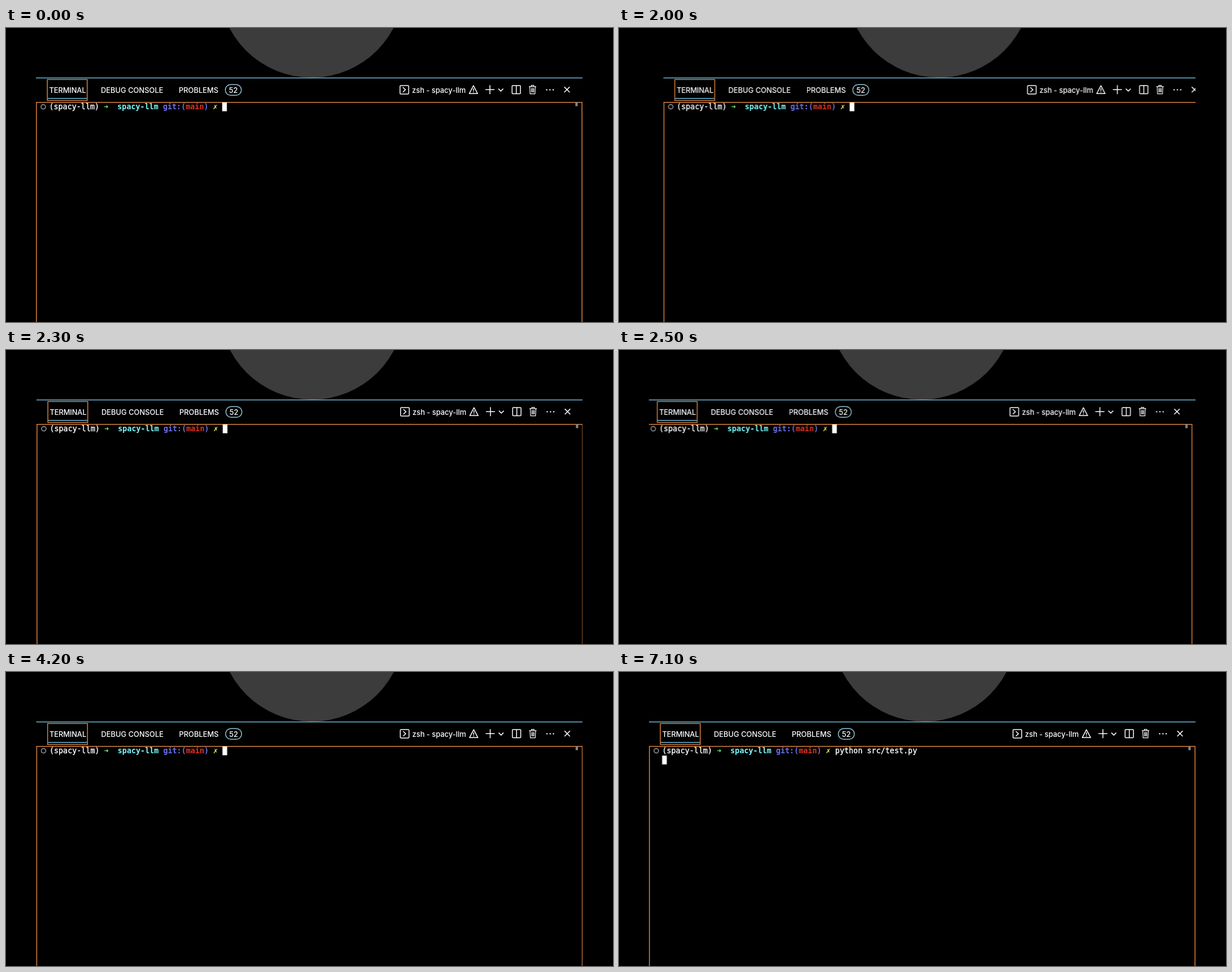
Recreate the animation shown at these times as an HTML page. Size 1075 px wide and 521 px high, loop 8 s.

```html
<!DOCTYPE html>
<html lang="en">
<head>
<meta charset="utf-8">
<title>Terminal</title>
<style>
  html, body { margin: 0; width: 100%; height: 100%; overflow: hidden; background: #000; }
  svg { display: block; width: 1075px; height: 521px; }
  .ui { font: 500 12.9px Inter, "Open Sans", sans-serif; fill: #fff; }
  .mono { font: 13.4px "DejaVu Sans Mono", monospace; white-space: pre; }
  .plain { fill: #fff; stroke: #fff; stroke-width: .35; }
  .b { font-weight: 700; }
  .icon { fill: none; stroke: #fff; stroke-width: 1.5; }
  .orange { fill: none; stroke: #d9823f; stroke-width: 1.5; }
  .blue { fill: none; stroke: #6fb8d8; stroke-width: 1.5; }

  /* 8 s loop: 1.25% is 100 ms */
  .panel, .focus, .cursor, .first, .rest { animation: 8s step-end infinite; }
  .panel { animation-name: swipe; }
  .focus { animation-name: blur; }
  .cursor { animation-name: cursor; }
  .first { animation-name: first; }
  .rest { animation-name: rest; }

  @keyframes swipe {
    0% { transform: translateX(0); }
    22.5% { transform: translateX(8px); }
    23.75% { transform: translateX(21px); }
    25% { transform: translateX(25.6px); }
    26.25% { transform: translateX(15px); }
    27.5% { transform: translateX(6px); }
    28.75% { transform: translateX(1px); }
    30% { transform: translateX(-3px); }
    31.25% { transform: translateX(-5.4px); }
    32.5% { transform: translateX(-.5px); }
    33.75% { transform: translateX(0); }
    48.75% { transform: translateX(1px); }
    50% { transform: translateX(2px); }
    51.25% { transform: translateX(1.5px); }
    52.5% { transform: translateX(.5px); }
    53.75%, 100% { transform: translateX(0); }
  }
  @keyframes blur {
    0% { visibility: visible; }
    42.5% { visibility: hidden; }
    43.75%, 100% { visibility: visible; }
  }
  @keyframes cursor {
    0% { transform: translate(0, 0); fill: #fff; }
    42.5% { transform: translate(0, 0); fill: #000; }
    43.75% { transform: translate(0, 0); fill: #fff; }
    60% { transform: translate(8.07px, 0); fill: #fff; }
    66.25% { transform: translate(145.2px, 0); fill: #fff; }
    87.5%, 100% { transform: translate(-306.5px, 16.2px); fill: #fff; }
  }
  @keyframes first {
    0% { visibility: hidden; }
    60%, 100% { visibility: visible; }
  }
  @keyframes rest {
    0% { visibility: hidden; }
    66.25%, 100% { visibility: visible; }
  }
</style>
</head>
<body>
<svg viewBox="0 0 1075 521">
  <defs>
    <clipPath id="view"><rect x="53" y="0" width="968" height="521"/></clipPath>
  </defs>
  <g clip-path="url(#view)">
    <g class="panel">
      <circle cx="541" cy="-76" r="164" fill="#3c3c3c"/>
      <rect x="53" y="88" width="1000" height="440"/>
      <path class="blue" d="M53 88.4H1060"/>

      <!-- tabs -->
      <rect class="orange" x="73.2" y="91.3" width="70.6" height="37.2"/>
      <path class="blue" d="M74 124.8H143"/>
      <g class="ui">
        <text x="76.4" y="114.5" letter-spacing="-.1">TERMINAL</text>
        <text x="168" y="114.5">DEBUG CONSOLE</text>
        <text x="306" y="114.5">PROBLEMS</text>
        <text x="402.6" y="115" text-anchor="middle">52</text>
        <text x="719" y="114.5">zsh - spacy-llm</text>
      </g>
      <rect class="blue" x="388.4" y="100.3" width="28.4" height="19" rx="9.5" style="stroke:#8fc4d6"/>

      <!-- actions -->
      <g class="icon">
        <rect x="697.8" y="101.9" width="15.4" height="15" rx="1.5"/>
        <path d="M702.8 105l4.6 4.4-4.6 4.4"/>
        <path d="M827.8 102.2L835.2 116.3H820.4ZM827.8 107v4.6M827.8 112.8v1.5" stroke-linejoin="round"/>
        <path d="M849 109.3h16M857 101.3v16"/>
        <path d="M872 107.6l4.3 4.3 4.3-4.3"/>
        <rect x="896.3" y="101.9" width="14.8" height="14.6" rx="1.2"/>
        <path d="M903.7 102v14.5"/>
        <path d="M926 103.9h13M930.3 103.6v-2h4.4v2M927.5 104l.7 12.6h8.6l.7-12.6M930.6 106.5v7.5M932.6 106.5v7.5M934.6 106.5v7.5" stroke-width="1.2"/>
        <path d="M988.7 104.4l9.6 9.6M998.3 104.4l-9.6 9.6"/>
      </g>
      <g fill="#fff">
        <circle cx="957.5" cy="109.4" r="1.2"/>
        <circle cx="963.3" cy="109.4" r="1.2"/>
        <circle cx="969.1" cy="109.4" r="1.2"/>
      </g>

      <!-- shell -->
      <rect class="orange focus" x="53.9" y="131.8" width="966.2" height="420"/>
      <rect x="1008.3" y="131.3" width="4.2" height="7.2" fill="#858585"/>
      <circle cx="66" cy="139.6" r="4" fill="none" stroke="#8c8c8c" stroke-width="1.7"/>
      <g class="mono">
        <text class="plain" x="76.4" y="144.4">(spacy-llm)</text>
        <text class="b" x="173.1" y="144.4" fill="#6bef6c">➜</text>
        <text class="b" x="197.3" y="144.4" fill="#78fbfd">spacy-llm</text>
        <text class="b" x="277.9" y="144.4" fill="#6b6ff0">git:(<tspan fill="#e6301f">main</tspan>)</text>
        <text class="b" x="366.6" y="144.4" fill="#f6f25f">✗</text>
        <text class="plain first" x="382.8" y="144.4">p</text>
        <text class="plain rest" x="390.9" y="144.4">ython src/test.py</text>
      </g>
      <rect class="cursor" x="383.3" y="132.4" width="7.4" height="14.6" stroke="#fff"/>
    </g>
  </g>
</svg>
</body>
</html>
```
